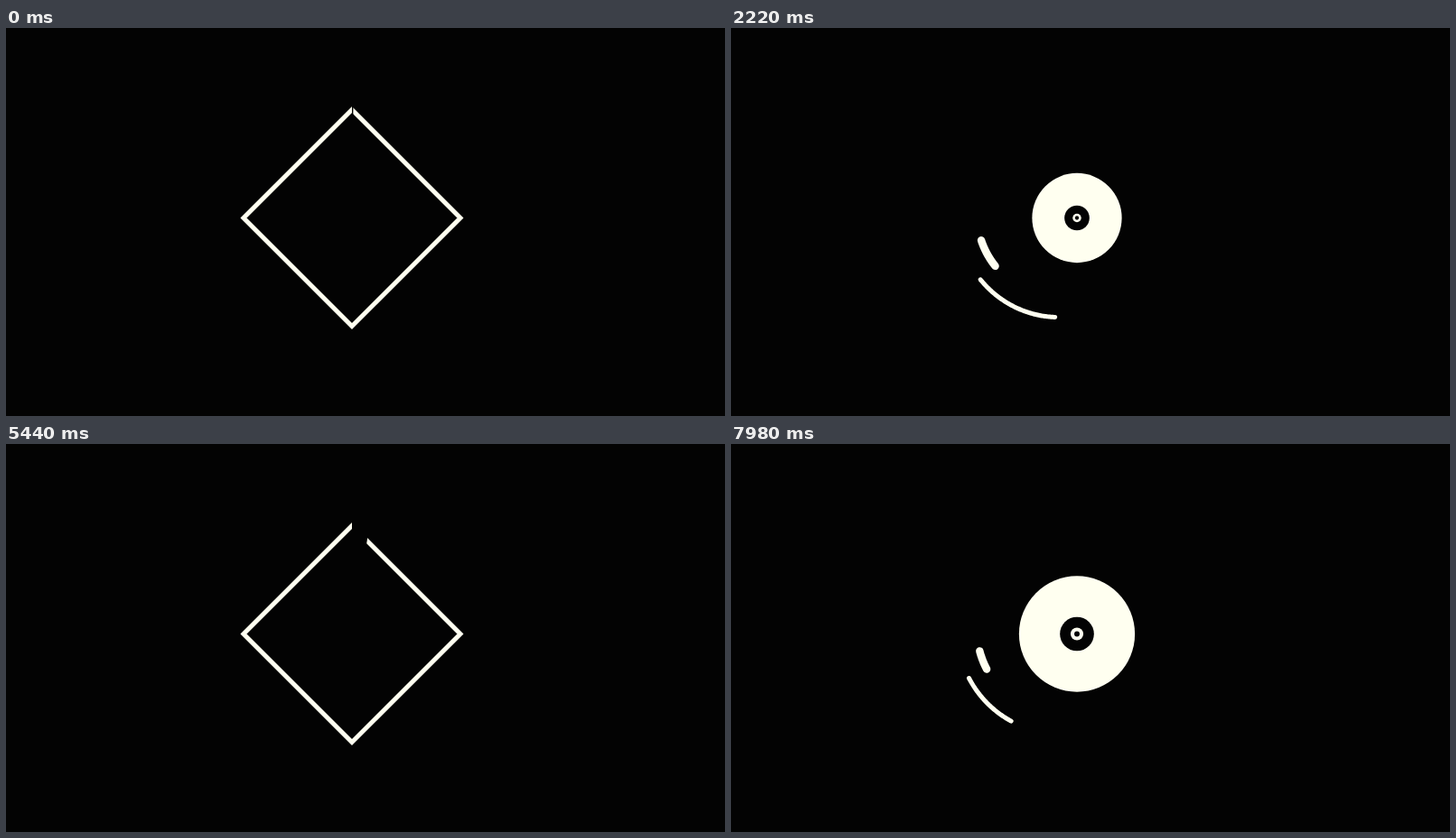
Write an HTML page with a canvas that moves like this. It is 796 px wide and 430 px high and loops after 8000 ms.

```html
<!DOCTYPE html>
<html lang="en">
<head>
<meta charset="utf-8">
<title>Shapes in motion</title>
<style>
  html, body { margin: 0; width: 100%; height: 100%; overflow: hidden; background: #030303; }
  canvas { display: block; }
</style>
</head>
<body>
<canvas id="stage" width="796" height="430"></canvas>
<script>
const ctx = document.getElementById('stage').getContext('2d');
const LOOP = 8000, CYCLE = 5600;
const CX = 383, CY = 210.5;
const INK = '#fffff0', PAPER = '#030303';
const TAU = Math.PI * 2, RAD = Math.PI / 180;

// Progress from 0 to 1 between two times.
const span = (t, from, to) => Math.min(1, Math.max(0, (t - from) / (to - from)));
// S-shaped progress that is halfway at mid.
const sweep = (t, mid, power) => 1 / (1 + Math.pow(mid / t, power));

// The trails follow off-centre spirals; head and tail are [mid time, steepness].
const trails = [
  { width: 8.5, base: 11.6, growth: 0.087, shift: 20.6, head: [1161, 7.1], tail: [1318, 6.6] },
  { width: 5, base: 16.5, growth: 0.113, shift: 14.6, head: [1364, 6.9], tail: [1541, 6.4] }
];

// Discs painted over each other: share of the outer radius at first and at last, and how late it grows.
const discs = [
  { first: 1, last: 1, power: 1 },
  { first: 0.27, last: 1, power: 4 },
  { first: 0.088, last: 0.76, power: 4 },
  { first: 0.042, last: 0.76, power: 6 }
];

function drawSquare(t) {
  const drawing = t > 3000;
  const shown = Math.sin(span(drawing ? t : t + CYCLE, 4140, 5660) * Math.PI / 2);
  const p = drawing ? 0 : span(t, 637, 1057);
  if (shown <= 0 || p >= 1) return;

  ctx.save();
  if (shown < 1) {
    ctx.beginPath();
    ctx.moveTo(0, 0);
    ctx.arc(0, 0, 300, -Math.PI / 2, -Math.PI / 2 - shown * TAU, true);
    ctx.clip();
  }
  ctx.rotate(TAU * Math.pow(1 - p, 4));
  const r = 120 + 30 * p;
  ctx.lineWidth = 5 * (1 - p);
  ctx.beginPath();
  ctx.moveTo(0, -r);
  ctx.lineTo(r, 0);
  ctx.lineTo(0, r);
  ctx.lineTo(-r, 0);
  ctx.closePath();
  ctx.stroke();
  ctx.restore();
}

function drawTrail({ width, base, growth, shift, head, tail }, t) {
  if (t <= 740 || t >= 2800) return;
  const angle = end => 70 + 825 * sweep(t, ...end);
  const from = angle(tail), to = angle(head), steps = 80;
  ctx.save();
  ctx.lineWidth = width * span(t, 740, 800) * span(t, 2800, 2600);
  ctx.lineCap = ctx.lineJoin = 'round';
  ctx.beginPath();
  for (let i = 0; i <= steps; i++) {
    const a = from + (to - from) * i / steps;
    const r = (base + growth * a - shift * Math.cos(a * RAD)) * span(a, 65, 112);
    ctx.lineTo(r * Math.cos(a * RAD), r * Math.sin(a * RAD));
  }
  ctx.stroke();
  ctx.restore();
}

function drawDiscs(t) {
  const p = span(t, 1673, 3340);
  if (p <= 0 || p >= 1) return;
  discs.forEach(({ first, last, power }, i) => {
    ctx.fillStyle = i % 2 ? PAPER : INK;
    ctx.beginPath();
    ctx.arc(0, 0, 151 * p * (first + (last - first) * Math.pow(p, power)), 0, TAU);
    ctx.fill();
  });
}

function drawSparks(t) {
  if (t < 3340 || t >= 4060) return;
  const length = 1.5 + 16 * Math.pow(1 - span(t, 3340, 3940), 2);
  ctx.save();
  ctx.lineWidth = 1.5;
  for (let side = 0; side < 4; side++) {
    ctx.rotate(Math.PI / 2);
    ctx.beginPath();
    for (const x of [-15.3, 0, 15.3]) {
      const r = x ? 114.8 : 151.7;
      ctx.moveTo(x, -r);
      ctx.lineTo(x, length - r);
    }
    ctx.stroke();
  }
  ctx.restore();
}

function draw(now) {
  const t = now % LOOP % CYCLE;
  ctx.setTransform(1, 0, 0, 1, 0, 0);
  ctx.fillStyle = PAPER;
  ctx.fillRect(0, 0, 796, 430);
  ctx.translate(CX, CY);
  ctx.strokeStyle = INK;
  drawSquare(t);
  drawDiscs(t);
  for (const trail of trails) drawTrail(trail, t);
  drawSparks(t);
}

const start = performance.now();
function tick() {
  draw(performance.now() - start);
  requestAnimationFrame(tick);
}
tick();
</script>
</body>
</html>
```
